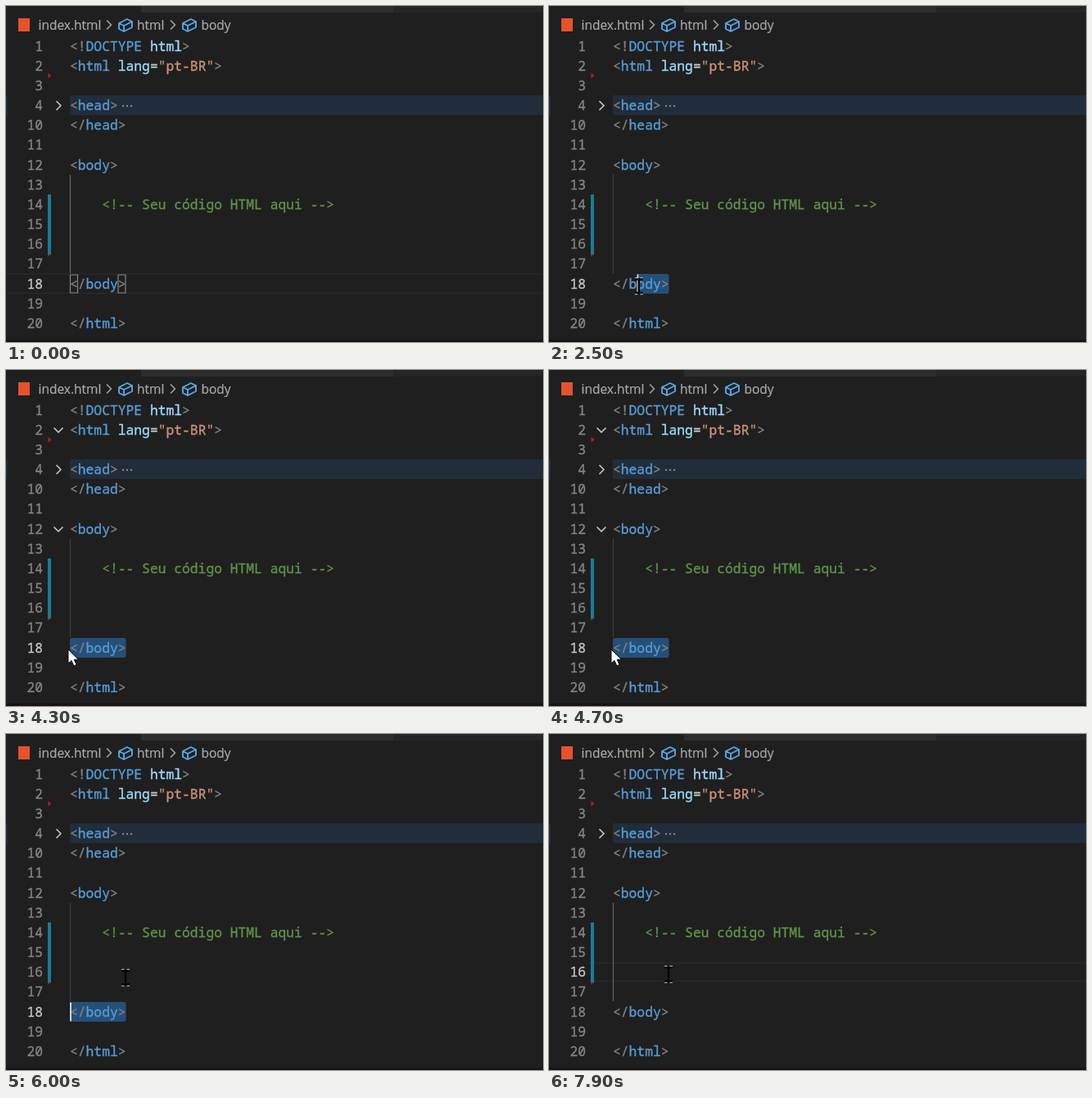
Recreate the animation shown at these times as an HTML page. Size 656x410 px, loop 8000 ms.

```html
<!DOCTYPE html>
<html lang="pt-BR">
<head>
<meta charset="utf-8">
<style>
  html, body { margin: 0; width: 100%; height: 100%; overflow: hidden; background: #1f1f1f; }
  svg { display: block; width: 656px; height: 410px; }
  text { white-space: pre; }
  .code text { font: 16.32px "Noto Sans Mono", "Liberation Mono", monospace; stroke-width: .35; }
  .crumbs text {
    font: 15.5px "Open Sans", "Noto Sans", sans-serif;
    fill: #a9a9a9; stroke: #a9a9a9; stroke-width: .2;
  }
  .line { fill: none; stroke-linecap: round; stroke-linejoin: round; }
</style>
</head>
<body>
<svg viewBox="0 0 656 410">
  <defs>
    <g id="cube" class="line" stroke="#58a8e4" stroke-width="1.9">
      <path d="M-8-2 2-7 8-4V3L-2 8-8 5ZM-8-2-2 1 8-4M-2 1V8"/>
    </g>
    <path id="next" class="line" d="M-2.500-5 2.500 0-2.500 5" stroke-width="1.7"/>
  </defs>

  <rect width="656" height="410" fill="#1f1f1f"/>
  <rect x="165" width="491" height="8" fill="#252526"/>
  <rect x="165" width="308" height="8" fill="#2d2d2d"/>
  <rect y="407" width="656" height="3" fill="#1a1216"/>

  <g class="crumbs">
    <rect x="15" y="15" width="14" height="16" fill="#e5532d"/>
    <text x="39.5" y="28.5">index.html</text>
    <use href="#next" x="126" y="23" stroke="#a0a0a0"/>
    <use href="#cube" x="146" y="23"/>
    <text x="160" y="28.5">html</text>
    <use href="#next" x="204" y="23" stroke="#a0a0a0"/>
    <use href="#cube" x="224" y="23"/>
    <text x="238.5" y="28.5">body</text>
  </g>

  <rect x="78" y="109" width="578" height="24" fill="#212d3b"/>
  <rect y="109" width="1.5" height="24" fill="#1d3148"/>
  <path id="currentLine" fill="none" stroke="#292929" stroke-width="1.6"/>
  <rect id="selection" y="327" height="24" rx="3" fill="#264f78"/>
  <path id="guide" d="M78.5 206V326" stroke-width="1.2"/>
  <rect x="51" y="230" width="4" height="73" fill="#177e97"/>
  <path d="M51.5 81.5 55.5 85 51.5 88.5ZM51 303H55L51.5 306Z" fill="#b41d1d"/>

  <g class="code" id="code"></g>
  <g fill="#8a8a8a">
    <circle cx="143" cy="122" r="1.2"/><circle cx="148" cy="122" r="1.2"/><circle cx="153" cy="122" r="1.2"/>
  </g>
  <use href="#next" x="64.5" y="121.5" stroke="#c5c5c5"/>
  <g id="folds" class="line" stroke="#c5c5c5" stroke-width="1.7">
    <path d="M59 71 64 76 69 71M59 192 64 197 69 192"/>
  </g>
  <path id="brackets" d="M78.5 328H87.5V350H78.5ZM137 328H146V350H137Z" fill="none" stroke="#888" stroke-width="1.2"/>
  <rect id="caret" width="2" height="23" fill="#d0d0d0"/>

  <g id="ring" fill="none">
    <circle stroke="#e4e4e4" stroke-width="7.4"/>
    <circle stroke="#8c8c8c" stroke-width="3.6"/>
  </g>
  <g id="beam">
    <path d="M-5-9.5H-1.5M1.5-9.5H5M-5 10H-1.5M1.5 10H5" stroke="#d5d5d5" stroke-width="1.6"/>
    <path d="M-5-8H5M-5 8.5H5M0-9V9.5" fill="none" stroke="#050505" stroke-width="2.4"/>
  </g>
  <path id="arrow" d="M0 0V17L4 13.5 6.8 20 10 18.6 7.2 12.3H12.5Z"
        fill="#fff" stroke="#111" stroke-width="1"/>
</svg>
<script>
const SVG = "http://www.w3.org/2000/svg";
const LOOP = 8000, LEFT = 78, ROW = 24.17, CHAR = 9.8;
const SELECT_START = 2250, SELECT_END = 2750, CLICK = 6400;
const RING_START = 7050, RING_END = 7550;
const $ = id => document.getElementById(id);
const colors = {
  b: "#808080", t: "#569cd6", a: "#9cdcfe", s: "#ce9178", c: "#5f9148", p: "#c5c5c5"
};
const paint = color => ({ fill: color, stroke: color });
const tag = name => [["b", "<"], ["t", name], ["b", ">"]];
const endTag = name => [["b", "</"], ["t", name], ["b", ">"]];
const rows = [
  [1, ["b", "<!"], ["t", "DOCTYPE"], ["a", " html"], ["b", ">"]],
  [2, ["b", "<"], ["t", "html"], ["a", " lang"], ["p", "="], ["s", '"pt-BR"'], ["b", ">"]],
  [3], [4, ...tag("head")], [10, ...endTag("head")], [11],
  [12, ...tag("body")], [13],
  [14, ["c", "    <!-- Seu código HTML aqui -->"]],
  [15], [16], [17], [18, ...endTag("body")], [19], [20, ...endTag("html")]
];

function set(node, attrs) {
  for (const key in attrs) node.setAttribute(key, attrs[key]);
}

function add(parent, name, attrs, content = "") {
  const node = document.createElementNS(SVG, name);
  set(node, attrs);
  node.textContent = content;
  return parent.appendChild(node);
}

const numbers = {};
rows.forEach(([number, ...tokens], i) => {
  const y = 54.5 + i * ROW;
  numbers[number] = add($("code"), "text", { x: 45, y, "text-anchor": "end" }, number);
  const text = add($("code"), "text", { x: LEFT, y });
  tokens.forEach(([kind, word]) => add(text, "tspan", paint(colors[kind]), word));
});

// Pointer stops: time, x, y
const stops = [
  [1150, 196, 424], [1600, 168, 368], [1850, 168, 368], [2200, 147, 342],
  [SELECT_START, 147, 342], [SELECT_END, 73, 341], [3700, 73, 341], [4200, 76, 341],
  [5400, 76, 341], [5900, 146, 297], [6100, 146, 297], [6350, 146, 293], [LOOP, 146, 293]
];
const clamp = v => Math.max(0, Math.min(1, v));
const ease = v => v * v * (3 - 2 * v);

function pointerAt(t) {
  if (t < stops[0][0]) return [stops[0][1], stops[0][2]];
  const i = stops.findIndex(stop => stop[0] > t);
  const [t0, x0, y0] = stops[i - 1], [t1, x1, y1] = stops[i];
  const k = ease((t - t0) / (t1 - t0));
  return [x0 + (x1 - x0) * k, y0 + (y1 - y0) * k];
}

const show = (id, on) => set($(id), { visibility: on ? "visible" : "hidden" });

function draw(t) {
  const [x, y] = pointerAt(t);
  const dragging = t >= SELECT_START && t < SELECT_END;
  const selected = t >= SELECT_START && t < CLICK;
  const clicked = t >= CLICK;
  const overGutter = x < LEFT - 1;

  const move = `translate(${x} ${y})`;
  set($("beam"), { transform: move });
  set($("arrow"), { transform: move });
  show("beam", !overGutter && t >= stops[0][0]);
  show("arrow", overGutter);
  set($("folds"), { opacity: clamp((t - 2650) / 300) * clamp((5750 - t) / 250) });

  const edge = dragging ? Math.max(LEFT, LEFT + Math.round((x - LEFT) / CHAR) * CHAR) : LEFT;
  set($("selection"), { x: edge, width: selected ? LEFT + 7 * CHAR - edge : 0 });
  show("selection", selected);
  show("brackets", t < SELECT_START);
  show("currentLine", !selected);
  set($("currentLine"), { d: clicked ? "M48 279.5H656M48 301.5H656" : "M0 327H656M0 350.5H656" });
  set($("guide"), { stroke: selected ? "#404040" : "#686868" });
  for (const n in numbers)
    set(numbers[n], paint(+n === (clicked ? 16 : 18) ? "#c6c6c6" : "#858585"));

  const blinkStart = clicked ? CLICK : SELECT_END + 50;
  show("caret", dragging || t >= SELECT_END && (t < blinkStart || (t - blinkStart) % 1000 < 500));
  set($("caret"), { x: edge, y: clicked ? 279 : 327.5 });

  const k = clamp((t - RING_START - 50) / (RING_END - RING_START - 50));
  show("ring", t >= RING_START && t < RING_END);
  set($("ring"), { transform: `translate(${x + 0.5} ${y + 0.5})` });
  for (const circle of $("ring").children) set(circle, { r: 97 * (1 - k) });
}

const start = performance.now();
function frame() {
  draw((performance.now() - start) % LOOP);
  requestAnimationFrame(frame);
}
frame();
</script>
</body>
</html>
```
